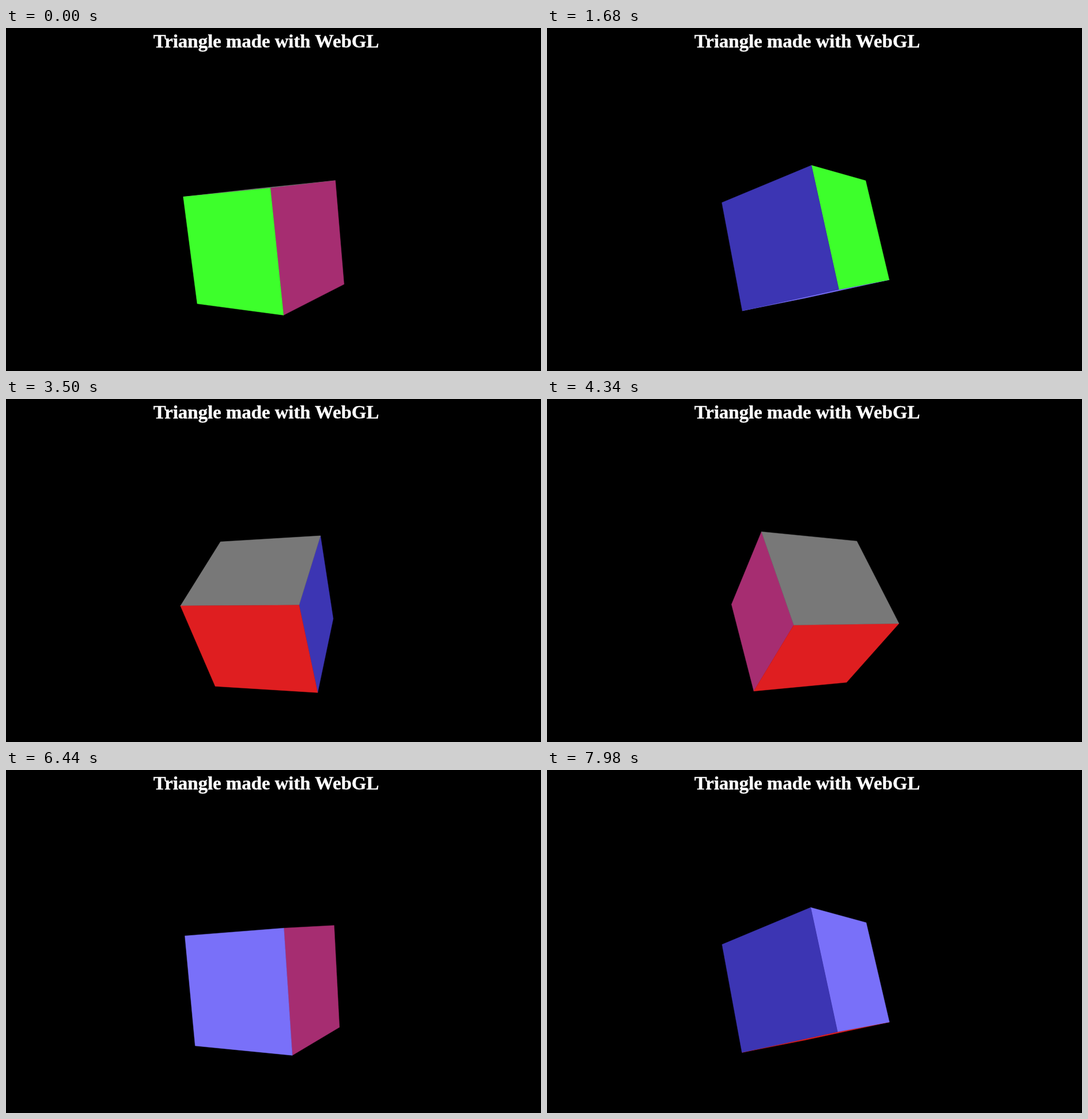
These frames come from a looping animation (906x582 px, 8000 ms). An HTML page with a canvas:

```html
<!DOCTYPE html>
<html lang="en">
<head>
<meta charset="utf-8">
<title>Rotating cube</title>
<style>
  html, body { margin: 0; width: 100%; height: 100%; overflow: hidden; background: #000; }
  canvas { position: absolute; left: 0; top: 0; }
  h1 {
    position: absolute; left: 0; top: 4px; width: 881px; margin: 0;
    font: bold 32px/37px "Liberation Serif", Times, serif;
    color: #fff; text-align: center; white-space: nowrap;
    -webkit-text-stroke: 0.4px #fff;
  }
</style>
</head>
<body>
<canvas id="stage" width="906" height="582"></canvas>
<h1>Triangle made with WebGL</h1>
<script>
const ctx = document.getElementById('stage').getContext('2d');
ctx.lineJoin = 'round';
ctx.lineWidth = 0.5;

const LOOP = 8000, STEP = 70;
const START_DEG = -38.7, DEG_PER_STEP = 3.992;
const CENTER = { x: 441, y: 363.2 };
const CAMERA = 8;
const FOCAL = 300 / Math.tan(Math.PI / 8);

// Each face lies across one axis, on its positive or negative side.
const FACES = [
  { axis: 0, side: 1, color: '#3c35b3' },
  { axis: 0, side: -1, color: '#a62d71' },
  { axis: 1, side: 1, color: '#787878' },
  { axis: 1, side: -1, color: '#7970f9' },
  { axis: 2, side: 1, color: '#df1e20' },
  { axis: 2, side: -1, color: '#3dff2b' }
];
const CORNERS = [[-1, -1], [1, -1], [1, 1], [-1, 1]];

// Tilt about x by a quarter of the angle, then spin about y.
function rotate([x, y, z], angle) {
  const tilt = angle / 4;
  const ty = y * Math.cos(tilt) - z * Math.sin(tilt);
  const tz = y * Math.sin(tilt) + z * Math.cos(tilt);
  return [
    x * Math.cos(angle) + tz * Math.sin(angle),
    ty,
    tz * Math.cos(angle) - x * Math.sin(angle)
  ];
}

function project([x, y, z]) {
  const scale = FOCAL / (CAMERA + z);
  return [CENTER.x - x * scale, CENTER.y - y * scale];
}

function facePoint({ axis, side }, u, v) {
  const point = [0, 0, 0];
  point[axis] = side;
  point[(axis + 1) % 3] = u;
  point[(axis + 2) % 3] = v;
  return point;
}

// The rotated face centre is also its normal; the camera sits at z = -CAMERA.
function facing(face, angle) {
  return -1 - CAMERA * rotate(facePoint(face, 0, 0), angle)[2];
}

function drawFace(face, angle) {
  ctx.beginPath();
  for (const [u, v] of CORNERS) {
    ctx.lineTo(...project(rotate(facePoint(face, u, v), angle)));
  }
  ctx.closePath();
  ctx.fillStyle = ctx.strokeStyle = face.color;
  ctx.fill();
  ctx.stroke();
}

function draw(time) {
  const step = Math.floor((time % LOOP) / STEP);
  const angle = (START_DEG + DEG_PER_STEP * step) * Math.PI / 180;
  ctx.clearRect(0, 0, 906, 582);
  // Oblique faces go first, so their outlines stay under the frontal ones.
  FACES.filter(face => facing(face, angle) > 0)
    .sort((a, b) => facing(a, angle) - facing(b, angle))
    .forEach(face => drawFace(face, angle));
}

let start;
function tick(now) {
  start ??= now;
  draw(now - start);
  requestAnimationFrame(tick);
}
draw(0);
requestAnimationFrame(tick);
</script>
</body>
</html>
```
